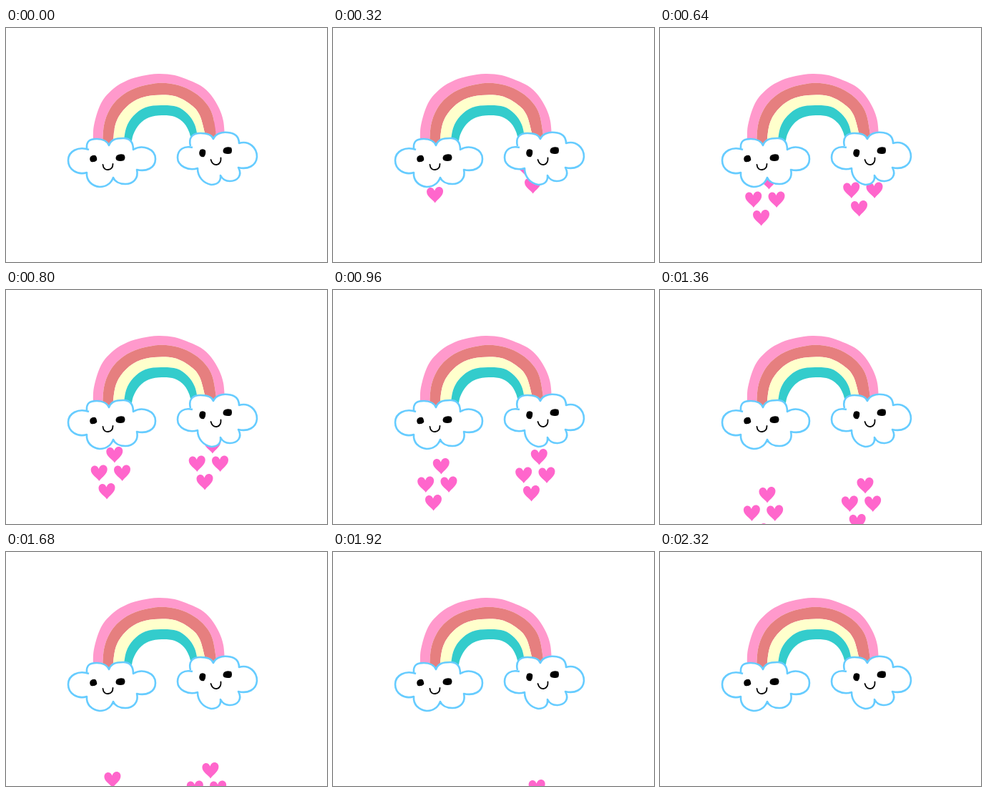
An HTML page that plays this animation: 449x327 px, repeating every 2.4 s.

```html
<!DOCTYPE html>
<html>
<head>
<meta charset="utf-8">
<style>
html, body { margin: 0; width: 100%; height: 100%; overflow: hidden; background: #fff; }
svg { display: block; width: 449px; height: 327px; }
.cloud { fill: #fff; stroke: #66ccff; stroke-width: 2.6; stroke-linejoin: round; }
.mouth { fill: none; stroke: #000; stroke-width: 1.8; stroke-linecap: round; }
</style>
</head>
<body>
<svg viewBox="0 0 449 327">
  <defs>
    <path id="heart" fill="#ff66cc" d="M0 11.5C-2 7-11.5 3-11.5-4C-11.5-11-3-12.5-.5-5.5C2-13.5 11.5-12 11.5-5C11.5 2 4 6 0 11.5Z"/>
    <g id="hearts">
      <use href="#heart"/>
      <use href="#heart" x="-10.8" y="-25.5"/>
      <use href="#heart" x="21.5" y="-25.5"/>
      <use href="#heart" x="10.8" y="-51"/>
    </g>
  </defs>

  <g id="rain">
    <use href="#hearts"/>
    <use href="#hearts" x="137" y="-13"/>
  </g>

  <g id="rainbow"></g>

  <path class="cloud" d="M113 169C112 158 117 155 127 155C136 155 142 159 144 164C147 156 153 154 164 154C174 154 178 160 178 170C191 162 209 169 209 183C209 196 196 201 183 198C186 211 177 218 167 218C158 218 152 214 150 209C147 217 140 222 131 222C120 221 112 213 113 202C100 206 87 198 87 185C87 172 101 165 116 170"/>
  <path class="cloud" d="M258 165C255 153 261 147 272 147C282 147 288 149 290 155C293 148 301 145 310 146C321 147 326 152 326 161C340 157 351 167 351 180C350 193 338 198 325 195C331 206 324 214 313 214C306 214 302 210 300 206C301 215 295 219 287 219C276 217 268 208 268 196C255 200 240 193 240 181C240 170 249 164 261 167"/>

  <path d="M118 180Q121 177 125 178Q128 181 127 185Q124 188 119 187Q116 184 118 180Z
           M155 178Q160 175 165 177Q168 181 165 185Q160 187 155 185Q152 182 155 178Z
           M272 170Q276 168 279 171Q280 177 277 180Q273 181 271 178Q269 174 272 170Z
           M305 168Q309 165 315 167Q317 171 315 175Q311 177 305 175Q302 172 305 168Z"/>
  <path class="mouth" d="M135.500 191C136 196 139 198.500 143 198C147 197.500 149.500 195 149.500 190
                         M286.500 184C288 189 291 191.500 295 191C299 190 301 187 300.500 181.500"/>
</svg>
<script>
// Outer edge of each band, widest first; the last one is the opening below.
const bands = [
  ["#ff99cc", [122,160, 123,136, 133,105, 150,85, 170,73, 190,67, 213,64, 236,66, 256,73, 273,81, 287,94, 298,112, 304,130, 306,153]],
  ["#e67f7f", [135,165, 137,136, 145,114, 159,97, 181,84, 213,77, 241,80, 263,90, 279,104, 289,122, 295,156]],
  ["#ffffcc", [149,165, 153,135, 164,115, 183,100, 207,94, 235,95, 257,106, 271,122, 280,155]],
  ["#33cccc", [164,165, 168,140, 178,123, 195,111, 217,108, 239,110, 254,120, 264,135, 269,157]],
  ["#ffffff", [175,165, 178,149, 187,134, 200,125, 218,122, 236,124, 249,133, 256,145, 260,160]]
];

// Smooth curve through the points
function curve(p) {
  const at = i => {
    const k = Math.max(0, Math.min(p.length / 2 - 1, i)) * 2;
    return [p[k], p[k + 1]];
  };
  let d = "M" + at(0);
  for (let i = 0; i < p.length / 2 - 1; i++) {
    const [a, b, c, e] = [at(i - 1), at(i), at(i + 1), at(i + 2)];
    const c1 = b.map((v, k) => v + (c[k] - a[k]) / 6);
    const c2 = c.map((v, k) => v - (e[k] - b[k]) / 6);
    d += `C${c1} ${c2} ${c}`;
  }
  return d;
}

// Each band is a ring segment: outer edge, then the next edge backwards.
function reversed(p) {
  const r = [];
  for (let i = p.length - 2; i >= 0; i -= 2) r.push(p[i], p[i + 1]);
  return r;
}

document.getElementById("rainbow").innerHTML = bands.slice(0, -1).map(([color, edge], i) =>
  `<path fill="${color}" d="${curve(edge)}${curve(reversed(bands[i + 1][1])).replace("M", "L")}Z"/>`
).join("");

const rain = document.getElementById("rain");
const LOOP = 2400, STEP = 80;
const start = performance.now();

function draw(now) {
  const n = Math.floor(Math.max(0, now - start) % LOOP / STEP);
  rain.setAttribute("transform", `translate(${143.6 - 0.26 * n} ${201 + 8 * n})`);
  rain.setAttribute("visibility", n < 25 ? "visible" : "hidden");
  requestAnimationFrame(draw);
}
draw(start);
</script>
</body>
</html>
```
